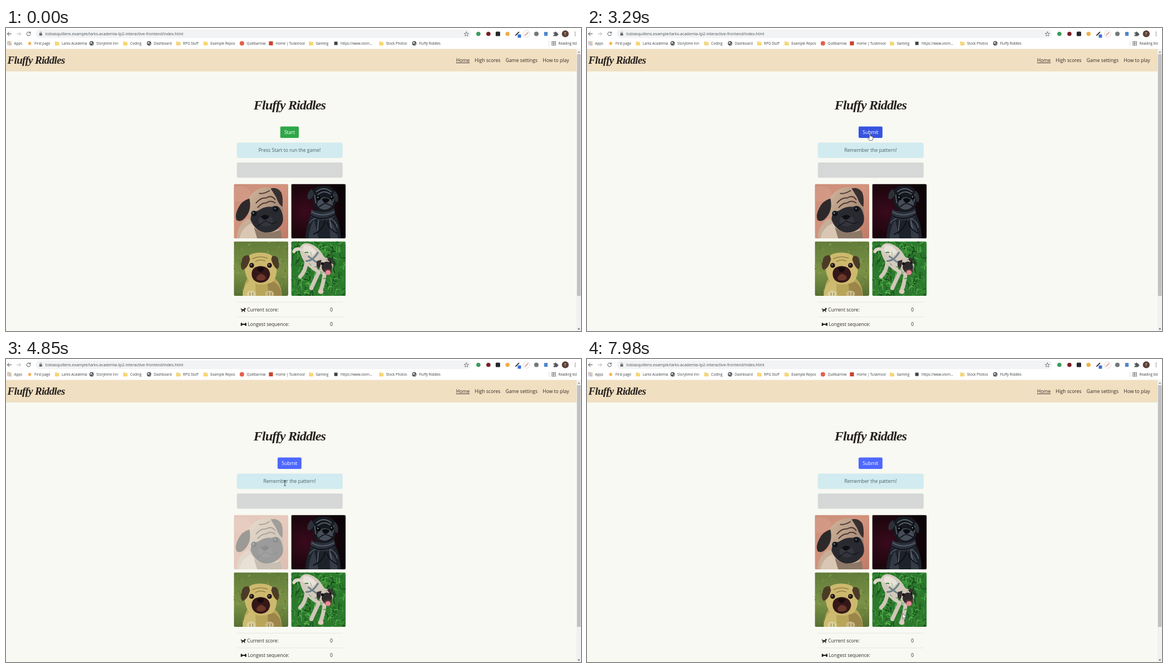
Animation, 1031 px wide and 543 px high, one loop 8 s. Source, as an HTML page:

```html
<!DOCTYPE html>
<html lang="en">
<head>
<meta charset="utf-8">
<title>Fluffy Riddles</title>
<style>
  html, body { margin: 0; width: 100%; height: 100%; overflow: hidden; background: #f8f9f3; }
  svg { display: block; }
  text { font-family: "Open Sans", "Noto Sans", sans-serif; font-size: 8.59px; fill: #332b26; white-space: pre; }
  .ui { font-size: 6.2px; fill: #3c4043; }
  .url { font-size: 7.08px; fill: #4d5155; }
  .brand { font-family: "Liberation Serif", "Noto Serif", serif; font-weight: bold; font-style: italic; fill: #26201e; }
  .mid { text-anchor: middle; }
  .info { fill: #43606a; }
  .btn { fill: #fff; }
</style>
</head>
<body>
<svg id="stage" width="1031" height="543" viewBox="0 0 1031 543">
  <defs>
    <clipPath id="tile"><rect width="97.5" height="97.5" rx="2.6"/></clipPath>
    <radialGradient id="wine" cx=".25" cy=".5" r=".75">
      <stop offset="0" stop-color="#3a0a1c"/><stop offset=".55" stop-color="#1f060f"/><stop offset="1" stop-color="#0a0407"/>
    </radialGradient>
    <linearGradient id="coral" x2="1" y2="1">
      <stop offset="0" stop-color="#cb8f7a"/><stop offset=".5" stop-color="#d2937d"/><stop offset="1" stop-color="#c07a66"/>
    </linearGradient>
    <linearGradient id="lawn" x2="0" y2="1">
      <stop offset="0" stop-color="#627c3a"/><stop offset=".55" stop-color="#7b9146"/><stop offset="1" stop-color="#566f32"/>
    </linearGradient>
    <linearGradient id="fur" x2="1" y2="1">
      <stop offset="0" stop-color="#d2b69d"/><stop offset="1" stop-color="#937866"/>
    </linearGradient>
  </defs>
  <g id="chrome"></g>
  <g id="page"></g>
  <g id="photos"></g>
  <circle id="press" cx="507" cy="186.5" fill="#d8dc18"/>
  <g id="pointer">
    <path id="arrow" d="M0 0V9.4L2.2 7.4L3.7 10.8L5.2 10.1L3.7 6.9H6.8Z" fill="#fff" stroke="#222" stroke-width=".6"/>
    <path id="hand" d="M-.9 1Q0-.8 .9 1V4.6Q2-.0 2.7 4.9Q3.8 4.1 4.3 5.3Q5.8 4.8 5.8 6.6Q5.9 9.5 4.6 12H-1Q-2.5 9.8-4 7.6Q-3.7 6-2 7.2L-.9 8.2Z" fill="#fff" stroke="#222" stroke-width=".65"/>
    <path id="beam" d="M-2-4.6H-.5L0-4.2L.5-4.6H2M0-4.2V4.2M-2 4.6H-.5L0 4.2L.5 4.6H2" fill="none" stroke="#222" stroke-width=".8"/>
  </g>
</svg>
<script>
const $ = id => document.getElementById(id);
const rect = (x, y, w, h, fill, more = '') => `<rect x="${x}" y="${y}" width="${w}" height="${h}" fill="${fill}" ${more}/>`;
const dot = (x, y, r, fill, more = '') => `<circle cx="${x}" cy="${y}" r="${r}" fill="${fill}" ${more}/>`;
const oval = (x, y, rx, ry, fill, more = '') => `<ellipse cx="${x}" cy="${y}" rx="${rx}" ry="${ry}" fill="${fill}" ${more}/>`;
const fill = (d, color, more = '') => `<path d="${d}" fill="${color}" ${more}/>`;
const line = (d, color, w = 1, more = '') => `<path d="${d}" fill="none" stroke="${color}" stroke-width="${w}" stroke-linecap="round" ${more}/>`;
const text = (x, y, s, cls = '', more = '') => `<text x="${x}" y="${y}" class="${cls}" ${more}>${s}</text>`;
const at = (x, y, s) => `<g transform="translate(${x} ${y})">${s}</g>`;

let seed = 11;
const rnd = () => (seed = seed * 16807 % 2147483647) / 2147483647;

// Browser bars
const star = 'M0-4L1.1-1.3L4-1.1L1.8.8L2.5 3.6L0 2.1L-2.5 3.6L-1.8.8L-4-1.1L-1.1-1.3Z';
const icons = {
  grid: () => [0, 1, 2, 3, 4, 5, 6, 7, 8].map(i =>
    rect(-3.4 + i % 3 * 2.6, -3.4 + (i / 3 | 0) * 2.6, 1.6, 1.6, ['#d8503f', '#4a8b4c', '#e0a52c', '#4c7bd0'][i % 4])).join(''),
  star: () => fill(star, '#f2a93b'),
  folder: () => fill('M-3.5-3H-.6L.3-2H3.5V3.4H-3.5Z', '#f7d774', 'stroke="#e8c14f" stroke-width=".4"'),
  globe: () => dot(0, 0, 3.9, '#55595d') + fill('M-2.6-1.5L0-2.6L.8-.8L-.6.6L-2 .4ZM.8 1L2.6.2L1.8 2.4Z', '#eee'),
  coral: () => dot(0, 0, 4, '#e2604a'),
  red: () => rect(-3.6, -3.6, 7.2, 7.2, '#c8452f'),
  dark: () => rect(-3, -3, 6, 6, '#3d4247')
};
const bookmarks = [
  ['grid', 6, 'Apps'], ['star', 42.5, 'First page'], ['folder', 91.5, 'Larks Academia'],
  ['globe', 153.5, 'Storytime Inn'], ['folder', 214, 'Coding'], ['globe', 256.5, 'Dashboard'],
  ['folder', 309, 'RPG Stuff'], ['folder', 358, 'Example Repos'], ['coral', 423, 'Quillbarrow'],
  ['red', 475, 'Home | Tuskmoor'], ['folder', 547, 'Gaming'], ['dark', 591.5, 'https://www.vlorn...'],
  ['folder', 673, 'Stock Photos'], ['globe', 732, 'Fluffy Riddles']
];
const gray = '#5f6368';
$('chrome').innerHTML =
  rect(0, 0, 1031, 38, '#fff') +
  rect(53, 2.5, 781, 15.5, '#f1f3f4', 'rx="7.75"') +
  line('M9.5 10.5H2.6M5.8 7.2L2.5 10.5L5.8 13.8', '#4a4d51', 1) +
  line('M19.5 10.5H26.4M23.2 7.2L26.5 10.5L23.2 13.8', '#b5b8bb', 1) +
  line('M43.3 8.4A3.4 3.4 0 1 0 43.9 11.2M43.9 6.8V9H41.6', '#4a4d51', 1) +
  rect(59.7, 9.6, 5, 4, gray, 'rx=".5"') + line('M60.8 9.5V8.5A1.4 1.4 0 0 1 63.6 8.5V9.5', gray, .8) +
  text(70.5, 13, 'tobiasquillens.example/larks-academia-tp2-interactive-frontend/index.html', 'url') +
  at(825.5, 10.7, line(star, gray, .8)) +
  dot(847, 10.5, 3.8, '#3d9b5c') + dot(865, 10.5, 3.8, '#7a1f24') +
  rect(878, 6.5, 8, 8, '#25272a', 'rx="1.5"') + dot(899.3, 10.5, 3.8, '#eeb04a') +
  line('M914 13L919.5 7.5', '#3a3d40', 1.8) + rect(917.5, 11.5, 6, 6, '#3b6fd8', 'rx=".8"') +
  dot(933.5, 10.5, 6, '#fff', 'stroke="#ccc" stroke-width=".7"') + line('M931 13L936 8', '#d97a66', 1.4) +
  dot(951, 10.5, 4, '#74787c') + rect(964.8, 7, 6.4, 7, '#4f86cf', 'rx="1"') +
  fill('M981.5 8H984A1.4 1.4 0 1 1 986.8 8H988.5V10A1.4 1.4 0 1 1 988.5 12.6V14.5H981.5V12.3A1.3 1.3 0 1 0 981.5 10Z', '#55585c') +
  dot(1002.8, 10.4, 6.2, '#5d4138') + text(1002.8, 12.7, 'T', 'ui mid', 'style="fill:#fff"') +
  [7.5, 10.5, 13.5].map(y => dot(1020.5, y, .85, gray)).join('') +
  bookmarks.map(([icon, x, name]) => at(x, 27.5, icons[icon]()) + text(x + 8.6, 29.9, name, 'ui')).join('') +
  line('M973.5 23V32', '#d5d7d9', .7) +
  at(982, 27.5, rect(-3.2, -3.3, 6.8, 6.8, 'none', `stroke="${gray}" stroke-width=".8"`) +
    line('M-1.8-1.5H2.2M-1.8 0H2.2M-1.8 1.5H2.2M-.4-3V3', gray, .6)) +
  text(990.6, 29.9, 'Reading list', 'ui');

// Page
const title = 'Fluffy Riddles';
const bar = (y, color, edge) => rect(414.3, y, 188.9, 26.6, color, `rx="2" stroke="${edge}" stroke-width=".5"`);
$('page').innerHTML =
  rect(0, 37.5, 1023, 40.3, '#f0dfc1') +
  text(2.5, 64, title, 'brand', 'style="font-size:19px;letter-spacing:-.65px"') +
  text(807, 61, 'Home', '', 'text-decoration="underline"') + text(840.3, 61, 'High scores') +
  text(895.8, 61, 'Game settings') + text(962.3, 61, 'How to play') +
  rect(1023, 37.5, 8, 506, '#f1f1f1') + rect(1023.8, 47, 6.6, 433, '#c1c1c1') +
  fill('M1025 44.2L1027.2 41.8L1029.4 44.2Z', '#888') + fill('M1025 538.5L1027.2 541L1029.4 538.5Z', '#505050') +
  text(508.5, 146, title, 'brand mid', 'style="font-size:24px;letter-spacing:-.9px"') +
  '<rect id="btn" y="176.5" height="20.4" rx="2"/>' + text(508.4, 189.8, '', 'btn mid', 'id="label"') +
  bar(205.8, '#d2ebf0', '#c6e7ed') + text(508.5, 222, '', 'info mid', 'id="note"') +
  bar(241.3, '#d6d8d8', '#cfd1d1') +
  line('M414 491.3H603.4M414 517.8H603.4', '#dee0dc', .7) +
  fill('M421 502L423.2 504H427L427.4 501L428.7 502L430 502.4V503.7L428.5 504.4V509H427.2V506.7H424V509H422.6V505.5L421 503.8Z', '#26201e') +
  text(432.3, 507.8, 'Current score:') + text(581, 507.8, '0') +
  line('M423 531H429', '#26201e', 2.2) +
  [[422.2, 529.8], [422.2, 532.2], [429.8, 529.8], [429.8, 532.2]].map(([x, y]) => dot(x, y, 1.5, '#26201e')).join('') +
  text(433.4, 534.3, 'Longest sequence:') + text(581, 534.3, '0');

// Photo stand-ins, each on a 97.5 square
const blades = (n, colors, len) => Array.from({ length: n }, () => {
  const x = rnd() * 98, y = rnd() * 98, a = rnd() * 6.3;
  return line(`M${x} ${y}q${Math.cos(a) * len} ${-len * .3} ${Math.cos(a) * len} ${Math.sin(a) * len}`,
    colors[rnd() * colors.length | 0], .6 + rnd() * 1.2);
}).join('');

const tilted = () => rect(0, 0, 98, 98, 'url(#coral)') +
  oval(10, 18, 20, 14, '#d8a18c', 'opacity=".5"') +
  fill('M6 98Q4 76 24 62L82 82L86 98Z', '#c6ae99') +
  fill('M10 98Q14 76 34 70L44 98Z', '#d9c6b3') + fill('M36 78Q56 94 84 82L86 98H42Z', '#8d7868') +
  fill('M26 26Q38 6 62 6Q82 9 86 34Q92 60 84 74Q72 88 56 87Q36 82 30 66Q22 44 26 26Z', 'url(#fur)') +
  fill('M28 26Q14 30 8 43Q1 56 5 65Q14 70 23 57Q32 45 28 26Z', '#2d292a') +
  fill('M66 8Q78 5 85 15Q89 25 87 41Q80 36 76 24Z', '#372f2f') +
  fill('M30 64Q30 50 43 48Q56 39 68 41Q82 34 87 54Q91 69 82 77Q72 88 56 87Q38 84 30 64Z', '#292a2f') +
  oval(57, 66, 13, 10, '#35363d') + fill('M48 59Q56 52 64 58Q60 64 54 64Z', '#0e0f13') +
  line('M42 76Q54 68 57 66Q68 74 78 68', '#131318', 1.2) +
  dot(36, 53, 5, '#111319') + dot(75, 45, 5, '#111319') + dot(34.8, 52, 1.4, '#77899a') + dot(74, 44, 1.2, '#77899a') +
  line('M40 34Q48 24 58 25Q68 19 74 28M43 42Q51 33 58 34Q66 28 74 34M46 17Q54 18 64 12', '#4d3a34', 2);

const hooded = () => rect(0, 0, 98, 98, 'url(#wine)') +
  fill('M25 98Q27 72 37 52Q58 38 76 49Q88 68 89 98Z', '#1d222a') +
  fill('M31 98Q33 76 41 64L49 98ZM68 66Q80 74 84 98H70Z', '#343b46') +
  fill('M36 45Q56 58 76 43Q82 54 74 62Q54 70 34 58Z', '#2c323c') +
  line('M37 50Q55 61 77 50M33 70Q36 64 43 62M70 62Q80 66 83 78', '#566070', 1.5) +
  line('M35 56Q55 68 78 55', '#0d1016', 2) + line('M49 65L47 84M69 63L72 80', '#7b8593', 1) +
  fill('M38 12Q44 2 60 3Q74 3 80 16Q82 37 74 46Q60 54 45 46Q36 36 38 12Z', '#15181e') +
  fill('M37 9Q28 14 29 26Q35 31 41 18ZM78 12Q87 20 83 33Q77 31 75 18Z', '#2b3038') +
  line('M45 14Q58 3 72 14M48 19Q59 10 70 18M42 20L44 34M76 20L75 32', '#59626f', 1.7) +
  fill('M46 35Q52 22 62 24Q74 26 75 37Q68 47 58 46Q48 45 46 35Z', '#464d58') +
  fill('M55 27Q62 23 69 28Q66 34 61 34Q57 33 55 27Z', '#090b0f') + line('M50 41Q59 34 62 35Q69 37 74 40', '#101318', 1.8) +
  dot(49, 25, 4, '#07090d') + dot(73, 24, 3.6, '#07090d') + dot(48, 24, 1.1, '#c0c8d0') + dot(72.2, 23, 1.1, '#c0c8d0') +
  line('M40 90Q58 82 61 66M82 88Q66 80 65 69', '#0d1016', 2);

const meadow = () => rect(0, 0, 98, 98, 'url(#lawn)') +
  blades(90, ['#8a9f54', '#597431', '#768d43'], 4) +
  fill('M17 98Q17 68 30 62H66Q86 70 86 98Z', '#b9a55a') +
  fill('M16 91Q22 68 38 69L40 98H16Z', '#cdbc6f') + fill('M60 69Q80 71 85 91V98H62Z', '#9b854a') +
  fill('M20 35Q26 20 47 20Q70 20 76 36Q80 62 69 73Q48 82 28 72Q17 58 20 35Z', '#cdb96d') +
  fill('M27 25Q15 23 14 36Q11 45 15 51Q24 50 29 32ZM69 26Q80 25 80 36Q83 45 78 50Q71 46 67 32Z', '#4b3b26') +
  fill('M32 60Q31 45 48 44Q64 45 65 59Q63 73 48 74Q34 73 32 60Z', '#351719') +
  fill('M41 64Q48 53 57 63Q58 70 48 70Q39 70 41 64Z', '#6b3729') + fill('M41 48Q48 44 55 48Q52 55 48 55Q43 54 41 48Z', '#160b0e') +
  dot(32, 43, 4.3, '#241516') + dot(64, 43, 4.3, '#241516') + dot(31, 42, 1, '#d6cba8') + dot(63, 42, 1, '#d6cba8') +
  line('M34 31Q46 25 60 30M39 36Q47 31 56 35', '#8e7640', 1.4) +
  oval(31, 94, 8, 6, '#dacf9f') + oval(64, 94, 8, 6, '#c9b985') +
  line('M29 92V97M34 92V97M62 92V97M67 92V97', '#806c43', .9);

const grassy = () => rect(0, 0, 98, 98, '#2c7a2d') +
  blades(260, ['#184f1c', '#46a03e', '#256a26', '#5cb350', '#12401a', '#368d35'], 9) +
  line('M27 37Q26 53 16 63M50 54Q44 66 36 84M60 56Q58 74 53 88', '#cfc6b8', 7) +
  fill('M15 12Q20 0 33 4Q48 8 58 26L72 42L60 60Q44 58 30 44Q16 30 15 12Z', '#d3cabd') +
  line('M19 15Q8 11 5 18', '#dcd4c8', 6) +
  fill('M22 7Q36 4 45 19L38 25Q26 23 21 16Z', '#e8e2d9') +
  line('M27 35Q38 36 48 20M31 27L46 38', '#6e8289', 3) +
  oval(60, 43, 15, 14, '#cfc4b5') + fill('M46 35Q44 47 49 51Q54 43 54 33ZM67 28Q75 30 77 41Q70 39 65 33Z', '#373032') +
  oval(64, 46, 9.5, 10, '#2d292b') + dot(56, 40, 2.6, '#151315') + dot(71, 38, 2.4, '#151315') +
  fill('M59 51Q66 47 73 51Q72 60 66 61Q60 59 59 51Z', '#583138') + oval(66, 56, 4.8, 4.4, '#e48c91') +
  oval(53, 90, 5, 4, '#e0c9bd') + blades(30, ['#256d28', '#3d963a'], 5);

$('photos').innerHTML = [tilted, hooded, meadow, grassy].map((draw, i) =>
  `<g id="dog${i}" transform="translate(${408.5 + i % 2 * 102.9} ${279.5 + (i >> 1) * 102.9})"><g clip-path="url(#tile)">${draw()}</g></g>`).join('');

// Motion: start, last step, steps, from, to
const moves = [
  [500, 1270, 12, [1031, 538], [533, 191]],
  [1340, 1550, 4, [533, 191], [507.5, 187.5]],
  [3290, 3700, 7, [507.5, 187.5], [500, 222.3]],
  [7570, 7980, 7, [500, 222.3], [566, 456]]
];
const flashes = [[3770, 4320], [4850, 5310], [5840, 6300], [6850, 7310]];
const LOOP = 8000, SWAP = 2835;

function pointerAt(t) {
  const move = moves.filter(m => t >= m[0]).pop();
  if (!move) return null;
  const [a, b, n, from, to] = move;
  const p = Math.min(1, (Math.floor((t - a) * (n - 1) / (b - a) + 1e-6) + 1) / n);
  const e = p * p * (3 - 2 * p);
  return from.map((v, i) => v + (to[i] - v) * e);
}

function render(t) {
  const pos = pointerAt(t), started = t >= SWAP;
  const half = started ? 21.4 : 16.6;
  const hover = pos && Math.abs(pos[0] - 508.4) < half && pos[1] > 176.5 && pos[1] < 197;
  const overText = pos && pos[1] > 205.8 && pos[1] < 232.4 && pos[0] > 452 && pos[0] < 565;

  $('btn').setAttribute('x', 508.4 - half);
  $('btn').setAttribute('width', half * 2);
  $('btn').setAttribute('fill', started ? (hover ? '#3654e0' : '#4d68ff') : (hover ? '#24843a' : '#2fa748'));
  $('label').textContent = started ? 'Submit' : 'Start';
  $('note').textContent = started ? 'Remember the pattern!' : 'Press Start to run the game!';
  $('dog0').setAttribute('opacity', flashes.some(([a, b]) => t >= a && t < b) ? .45 : 1);

  const fade = t >= 2700 && t < 2970 ? 1 - Math.floor((t - 2700) / 67.5) / 4 : 0;
  $('press').setAttribute('r', 3 + 3.6 * fade);
  $('press').setAttribute('opacity', .72 * fade);

  const kind = hover ? 'hand' : overText ? 'beam' : 'arrow';
  $('pointer').style.display = pos ? '' : 'none';
  if (pos) $('pointer').setAttribute('transform', `translate(${pos[0]} ${pos[1]})`);
  for (const id of ['arrow', 'hand', 'beam']) $(id).style.display = id === kind ? '' : 'none';
}

const start = performance.now();
function tick() {
  render((performance.now() - start) % LOOP);
  requestAnimationFrame(tick);
}
tick();
</script>
</body>
</html>
```
